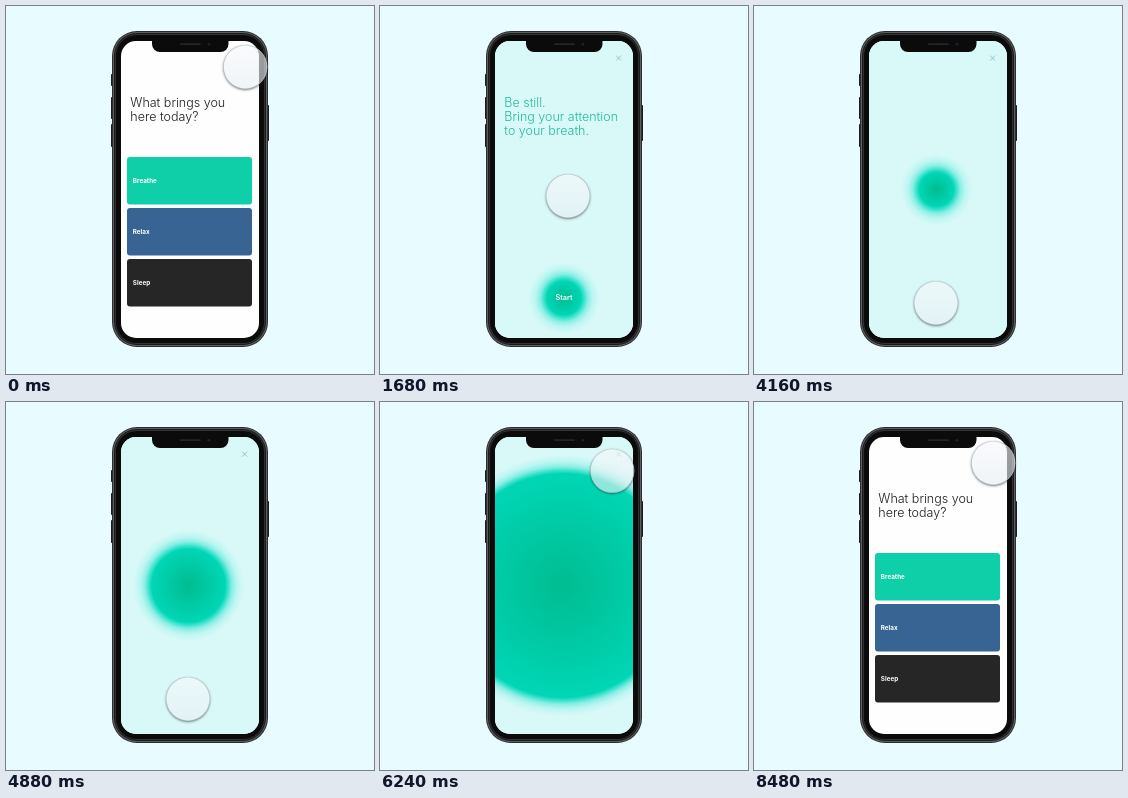
An HTML page with a canvas that plays this animation: 368 px wide and 368 px high, repeating every 8.56 s.

```html
<!DOCTYPE html>
<html lang="en">
<head>
<meta charset="utf-8">
<title>Breathing app</title>
<style>
html, body { margin: 0; width: 100%; height: 100%; overflow: hidden; background: #e8fcff; }
canvas { display: block; width: 368px; height: 368px; }
</style>
</head>
<body>
<canvas id="stage"></canvas>
<script>
const LOOP = 8560, SIZE = 368, STEP = 80;
const canvas = document.getElementById('stage');
const c = canvas.getContext('2d');
const dpr = window.devicePixelRatio || 1;
canvas.width = canvas.height = SIZE * dpr;

const mix = (a, b, p) => a + (b - a) * p;
const ramp = (t, a, b) => Math.min(1, Math.max(0, (t - a) / (b - a)));
const ease = (t, a, b) => (1 - Math.cos(Math.PI * ramp(t, a, b))) / 2;

function box(x, y, w, h, r, fill) {
  c.beginPath();
  c.roundRect(x, y, w, h, r);
  c.fillStyle = fill;
  c.fill();
}

function text(str, x, y, size, weight, color, align = 'left') {
  c.font = `${weight} ${size}px Poppins, Inter, sans-serif`;
  c.textAlign = align;
  c.fillStyle = color;
  c.fillText(str, x, y);
}

function layer(alpha, draw) {
  if (alpha <= 0) return;
  c.save();
  c.globalAlpha = alpha;
  draw();
  c.restore();
}

function lines(rows, color) {
  rows.forEach((row, i) => text(row, 124.3, 101 + i * 14, 12.5, 300, color));
}

function home() {
  box(114, 34, 140, 299, 15, '#fefefe');
  lines(['What brings you', 'here today?'], '#1c1c1c');
  [['Breathe', '#0ecfa8'], ['Relax', '#376492'], ['Sleep', '#262626']].forEach(([name, color], i) => {
    const y = 151 + i * 51;
    box(121, y, 125, 47.5, 3, color);
    text(name, 126.8, y + 26, 6.3, 700, '#fff');
  });
}

function orb(x, y, r) {
  const outer = r + 16;
  const g = c.createRadialGradient(x, y, 0, x, y, outer);
  const stop = (radius, color) => g.addColorStop(radius / outer, color);
  stop(0, '#00bc91');
  stop(r - 3, '#00d6b5');
  stop(r, 'rgba(0,218,188,.74)');
  stop(r + 4, 'rgba(0,220,194,.36)');
  stop(r + 9, 'rgba(0,222,200,.13)');
  stop(outer, 'rgba(0,222,200,0)');
  c.fillStyle = g;
  c.beginPath();
  c.arc(x, y, outer, 0, 7);
  c.fill();
}

function session(t, alpha) {
  box(114, 34, 140, 299, 15, '#d9f9f8');
  layer(alpha * (1 - ramp(t, 2720, 3280)), () =>
    lines(['Be still.', 'Bring your attention', 'to your breath.'], '#1fbb9c'));

  const rise = ease(t, 2800, 3700);
  const grow = ease(t, 4200, 6500);
  orb(mix(184, 182.5, rise), mix(292, 183.5, rise), mix(20, 118, grow));
  layer(alpha * (1 - ramp(t, 2720, 3040)), () =>
    text('Start', 184, 294.2, 7.3, 600, '#fff', 'center'));

  c.strokeStyle = '#82aaa9';
  c.lineWidth = 0.7;
  c.beginPath();
  c.moveTo(236.1, 49.6); c.lineTo(241.1, 54.6);
  c.moveTo(241.1, 49.6); c.lineTo(236.1, 54.6);
  c.stroke();
}

function phone() {
  for (const [x, y, h] of [[105, 68, 12], [105, 91, 22], [105, 118, 23], [261, 99, 36]])
    box(x, y, 2, h, 0.8, '#1c1c1e');
  // Nested rims of the metal frame, from the outside in.
  [[0, '#2b2b2d'], [0.9, '#5d5e61'], [2, '#1b1b1c'], [3, '#343436'], [3.9, '#0b0b0b']].forEach(([d, color]) =>
    box(106 + d, 25 + d, 156 - 2 * d, 316 - 2 * d, 25 - d, color));
}

function notch() {
  box(146, 32, 76.5, 14, [0, 0, 8, 8], '#0b0b0b');
  box(174, 37.2, 21, 1.7, 1, '#242527');
  c.beginPath();
  c.arc(203, 38.3, 1.3, 0, 7);
  c.fillStyle = '#18243c';
  c.fill();
}

function pointerAt(t) {
  const along = (a, m, b, s) => [0, 1].map(i => mix(mix(a[i], m[i], s), mix(m[i], b[i], s), s));
  const corner = [239.3, 61], card = [188, 190], start = [182, 297];
  if (t < 1800) return along(corner, [211, 120], card, ease(t, 60, 900));
  if (t < 5000) return along(card, [186, 245], start, ease(t, 1800, 2640));
  return along(start, [210, 82], corner, ease(t, 5400, 6484));
}

function pointer(t) {
  const [x, y] = pointerAt(t);
  const disc = () => { c.beginPath(); c.arc(x, y, 22, 0, 7); };

  // Keep the shadow outside the translucent disc.
  c.save();
  c.beginPath();
  c.rect(0, 0, SIZE, SIZE);
  c.arc(x, y, 21.5, 0, 7);
  c.clip('evenodd');
  c.shadowColor = 'rgba(20,35,40,.75)';
  c.shadowBlur = 2.5 * dpr;
  c.shadowOffsetY = 0.9 * dpr;
  disc();
  c.fillStyle = 'rgba(140,155,160,.8)';
  c.fill();
  c.restore();

  const g = c.createLinearGradient(0, y - 22, 0, y + 22);
  g.addColorStop(0, 'rgba(246,248,252,.62)');
  g.addColorStop(1, 'rgba(232,238,242,.62)');
  disc();
  c.fillStyle = g;
  c.fill();
}

function draw(t) {
  c.setTransform(dpr, 0, 0, dpr, 0, 0);
  c.fillStyle = '#e8fcff';
  c.fillRect(0, 0, SIZE, SIZE);
  phone();
  c.save();
  c.beginPath();
  c.roundRect(115, 35, 138, 297, 15);
  c.clip();
  home();
  const shown = ramp(t, 960, 1500) * (1 - ramp(t, 7360, 8000));
  layer(shown, () => session(t, shown));
  c.restore();
  notch();
  pointer(t);
}

const began = performance.now();
function tick() {
  const t = (performance.now() - began) % LOOP;
  draw(Math.floor(t / STEP) * STEP);
  requestAnimationFrame(tick);
}
tick();
</script>
</body>
</html>
```
